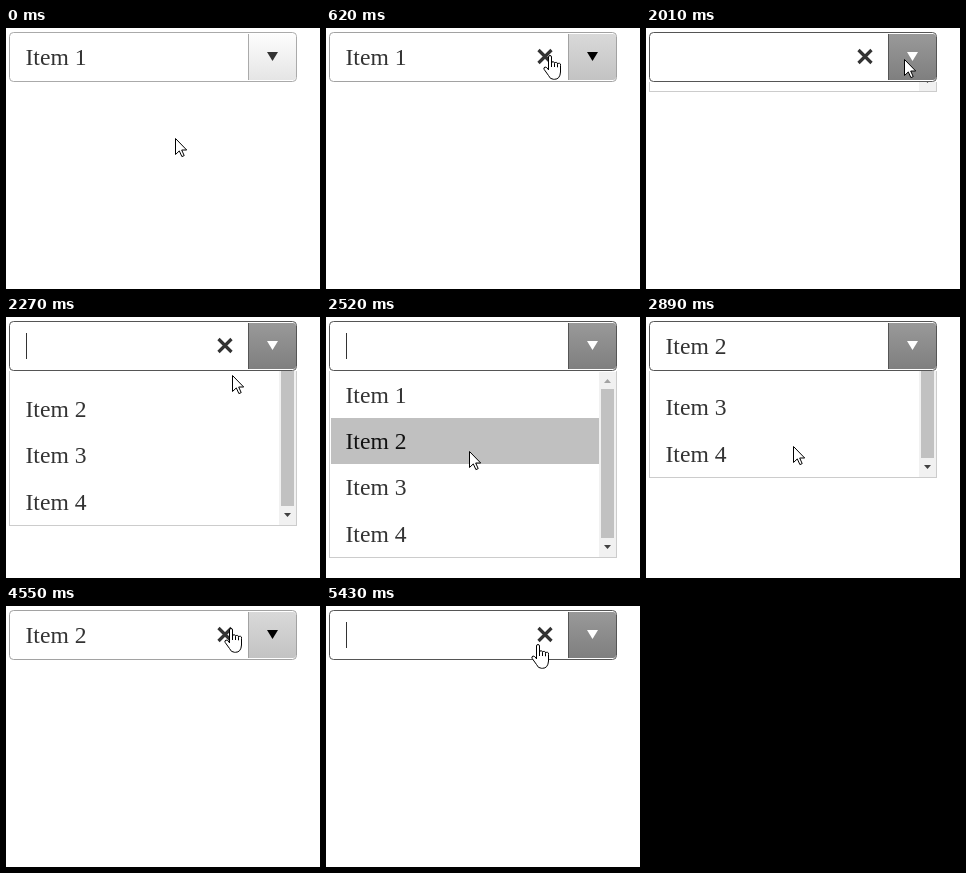
Write an HTML page that moves like this. It is 314x261 px and loops after 5.56 s.

```html
<!DOCTYPE html>
<html lang="en">
<head>
<meta charset="utf-8">
<title>Combo box</title>
<style>
  html, body { margin: 0; width: 100%; height: 100%; overflow: hidden; background: #fff; }
  svg { display: block; width: 314px; height: 261px; }
  text { font: 23.6px "Liberation Serif", "Times New Roman", serif; fill: #333; white-space: pre; }
  .frame, .divider { fill: none; stroke: var(--line); }
  .button { fill: var(--face); }
  .arrow { fill: var(--ink); }
  #combo.idle  { --line: #aaa; --face: url(#idle); --ink: #333; }
  #combo.hover { --line: #a2a2a2; --face: url(#hover); --ink: #000; }
  #combo.focus { --line: #555; --face: url(#focus); --ink: #fff; }
  #clear { stroke: #333; stroke-width: 3.2; fill: none; }
  .pointer { fill: #fff; stroke: #000; stroke-linejoin: round; }
</style>
</head>
<body>
<svg viewBox="0 0 314 261">
  <defs>
    <linearGradient id="idle" x2="0" y2="1"><stop stop-color="#fdfdfd"/><stop offset="1" stop-color="#e5e5e5"/></linearGradient>
    <linearGradient id="hover" x2="0" y2="1"><stop stop-color="#d9d9d9"/><stop offset="1" stop-color="#c3c3c3"/></linearGradient>
    <linearGradient id="focus" x2="0" y2="1"><stop stop-color="#999"/><stop offset="1" stop-color="#7f7f7f"/></linearGradient>
    <clipPath id="below"><rect y="54" width="314" height="207"/></clipPath>
  </defs>

  <g clip-path="url(#below)">
    <g id="list">
      <rect x="3.5" y="50.5" width="287" height="190" fill="#fff" stroke="#ccc"/>
      <rect id="highlight" x="5" width="268" height="46" fill="#c0c0c0"/>
      <g id="items"></g>
      <rect x="273" y="55" width="17" height="185" fill="#f1f1f1"/>
      <rect x="275" y="72" width="13" height="149" fill="#c1c1c1"/>
      <path d="M278 66h7l-3.5-4z" fill="#a3a3a3"/>
      <path d="M278 228h7l-3.5 4z" fill="#404040"/>
    </g>
  </g>

  <g id="combo">
    <rect class="frame" x="3.5" y="4.5" width="287" height="49" rx="4"/>
    <path class="button" d="M242 6h45q3 0 3 3v40q0 3-3 3h-45z"/>
    <path class="divider" d="M242.5 6v46"/>
    <path class="arrow" d="M261 24h11l-5.5 9z"/>
    <text id="value" x="19.5" y="37"></text>
    <path id="caret" d="M20.5 16v26" stroke="#333"/>
    <path id="clear" d="M212.5 22l13 13m0-13l-13 13"/>
  </g>

  <path id="arrow" class="pointer" d="M.5.5V16.5L4.3 12.9 6.9 18.6 9.2 17.6 6.7 12H11.7z"/>
  <path id="hand" class="pointer" d="M-.5 15V2a1.5 1.5 0 0 1 3 0V8a1.5 1.5 0 0 1 3 .5a1.5 1.5 0 0 1 3 .8a1.5 1.5 0 0 1 3 1V17q-.5 7.3-6 7.3H4.5Q1 24.3-.5 20.5L-4.8 14.5q-1-1.9.8-2.5q1.6-.3 3.5 2.8M2.5 8v4M5.5 8.5v3.5M8.5 9.3v3"/>
</svg>
<script>
const LOOP = 5560;
const TICKS = 44; // the screen refreshes this often per loop
const LIST_TOP = 54, LIST_HEIGHT = 187, ROW = 46.4;
const $ = id => document.getElementById(id);

// Moments of the story, in ticks.
const CLEAR = 9, OPEN = 15.48, PICK = 22, BLUR = 29, PRESS = 39, CLEAR_AGAIN = 40;

// Where the pointer's tip is: tick, x, y.
const path = [
  [0, 169, 110], [3, 232, 38], [6, 218, 21], [9, 222, 27], [13, 222, 27],
  [14, 258, 31], [16, 258, 31], [18, 226, 58], [20, 143, 134], [27, 152, 123],
  [29, 152, 123], [30, 144, 121], [35, 218, 29], [36, 224, 22], [41, 224, 22], [43, 211, 38],
];

function pointerAt(tick) {
  const i = Math.max(1, path.findIndex(([t]) => t >= tick));
  const [t0, x0, y0] = path[i - 1], [t1, x1, y1] = path[i];
  const u = (tick - t0) / (t1 - t0);
  return [Math.round(x0 + (x1 - x0) * u), Math.round(y0 + (y1 - y0) * u)];
}

function swing(tick, start, length) {
  const u = Math.min(1, Math.max(0, (tick - start) / length));
  return (1 - Math.cos(Math.PI * u)) / 2;
}

function valueAt(tick) {
  if (tick < CLEAR) return 'Item 1';
  return tick > PICK && tick < CLEAR_AGAIN ? 'Item 2' : '';
}

const items = [1, 2, 3, 4].map((n, row) => {
  const label = document.createElementNS('http://www.w3.org/2000/svg', 'text');
  label.setAttribute('x', 19.5);
  label.setAttribute('y', Math.floor(86 + row * ROW));
  label.textContent = 'Item ' + n;
  $('items').append(label);
  return label;
});

const show = (element, visible) => { element.style.display = visible ? '' : 'none'; };
const move = (element, x, y) => element.setAttribute('transform', `translate(${x} ${y})`);

function render(tick) {
  const [x, y] = pointerAt(tick);
  const value = valueAt(tick);
  const overCombo = y < 60;
  const focused = tick >= CLEAR && tick < BLUR || tick >= PRESS;
  $('combo').setAttribute('class', focused ? 'focus' : overCombo ? 'hover' : 'idle');
  $('value').textContent = value;
  show($('clear'), overCombo);

  const sinceClear = tick - (tick < CLEAR_AGAIN ? CLEAR : CLEAR_AGAIN);
  show($('caret'), focused && !value && sinceClear % 8 < 4);

  const opened = swing(tick, OPEN, 3.45) - swing(tick, PICK, 2.2);
  show($('list'), opened > 0);
  move($('list'), 0, Math.round((opened - 1) * LIST_HEIGHT));

  const hot = opened === 1 ? Math.floor((y - LIST_TOP - 1) / ROW) : -1;
  show($('highlight'), hot >= 0);
  $('highlight').setAttribute('y', Math.floor(LIST_TOP + 1 + hot * ROW));
  items.forEach((item, row) => { item.style.fill = row === hot ? '#111' : ''; });

  const overClear = Math.abs(x - 219) < 16 && Math.abs(y - 28) < 14;
  show($('hand'), overClear);
  show($('arrow'), !overClear);
  move($(overClear ? 'hand' : 'arrow'), x, y);
}

const start = performance.now();

function frame() {
  const time = Math.max(0, performance.now() - start) % LOOP;
  render(Math.min(TICKS - 1, Math.floor((time + 20) / LOOP * TICKS)));
  requestAnimationFrame(frame);
}
frame();
</script>
</body>
</html>
```
